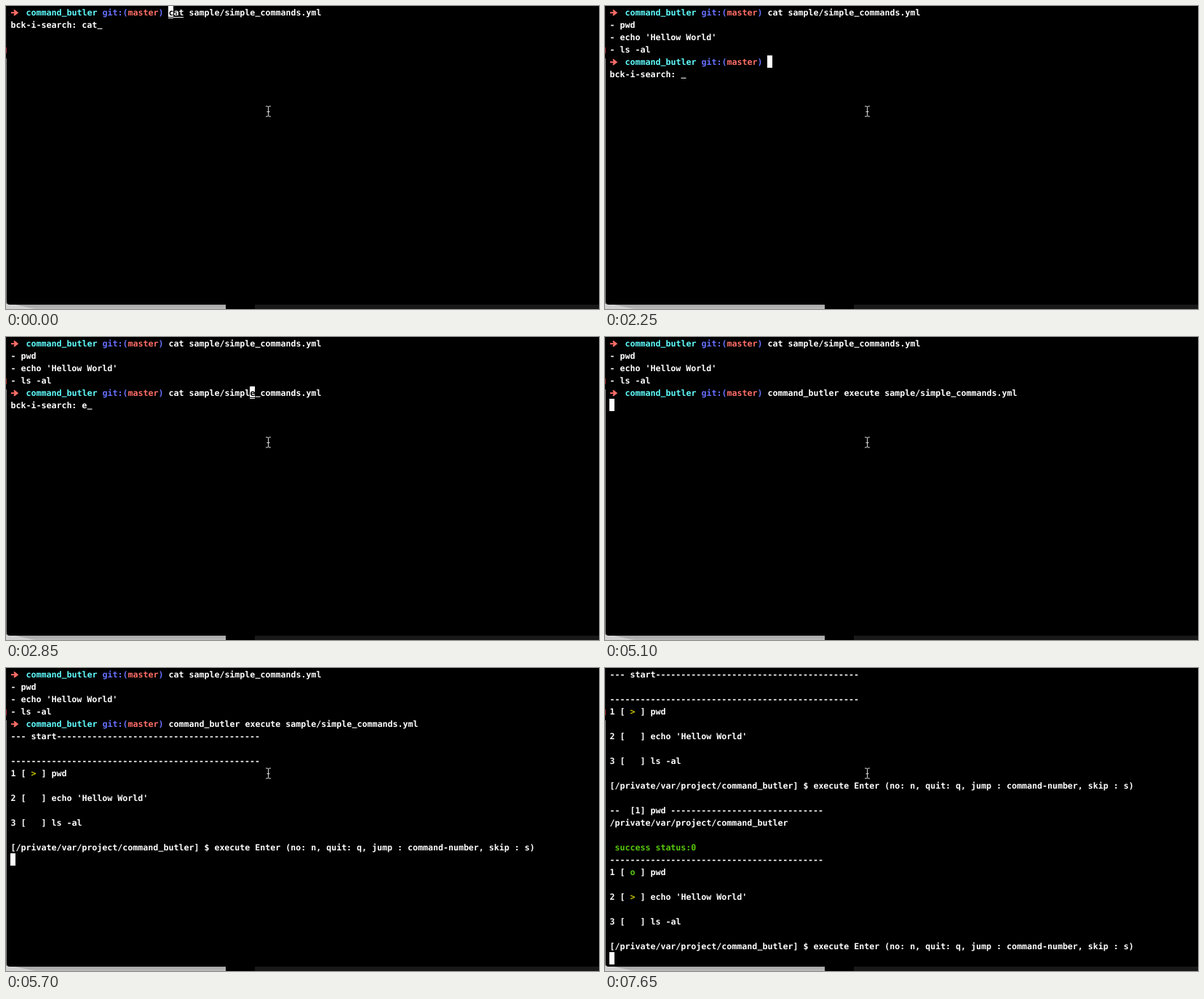
These frames come from a looping animation (815 px wide and 417 px high, 8000 ms). An HTML page:

```html
<!DOCTYPE html>
<html lang="en">
<head>
<meta charset="utf-8">
<title>Terminal session</title>
<style>
  html, body { margin: 0; width: 100%; height: 100%; overflow: hidden; background: #000; }
  svg { display: block; width: 815px; height: 417px; }
  text {
    font: 700 11.627px "DejaVu Sans Mono", monospace;
    font-variant-ligatures: none;
    text-rendering: geometricPrecision;
    white-space: pre;
  }
</style>
</head>
<body>
<svg viewBox="0 0 815 417">
  <defs>
    <linearGradient id="shade" x1="0" y1="0" x2="0" y2="1">
      <stop offset="0" stop-color="#8c8c8c"/>
      <stop offset="1" stop-color="#bcbcbc"/>
    </linearGradient>
  </defs>
  <!-- desktop behind the window -->
  <rect width="815" height="417" fill="#000"/>
  <rect width="1" height="72" fill="#101010"/>
  <rect y="57" width="1" height="8" fill="#a8322c"/>
  <rect y="72" width="1" height="338" fill="#8c8c8c"/>
  <rect y="405" width="302" height="12" fill="url(#shade)"/>
  <path d="M0 410H8L40 417H0Z" fill="#d2d2d2"/>
  <rect x="342" y="411" width="473" height="6" fill="#191919"/>
  <path d="M1 0H815V411H5Q1 411 1 407Z" fill="#000"/>
  <g id="screen"></g>
  <!-- mouse pointer -->
  <path d="M357 138h2q1.5 0 1.5 1.5v11q0 1.5-1.5 1.5h-2M364 138h-2q-1.5 0-1.5 1.5v11q0 1.5 1.5 1.5h2M358.5 145.5h4"
        fill="none" stroke="#d8d8d8"/>
</svg>
<script>
const LOOP = 8000, CELL = 7, ROW = 17, LEFT = 6, BASE = 13, BEARING = 0.5;
const WHITE = '#fff', RED = '#ff6e67', CYAN = '#60fdff', BLUE = '#6871ff';
const GREEN = '#58c80c', YELLOW = '#c7c400';
const screenEl = document.getElementById('screen');

// A line is a list of runs: [text, colour]
const plain = s => [[s, WHITE]];
const prompt = cmd => [
  ['➜', RED], ['  ', WHITE], ['command_butler', CYAN], [' git:(', BLUE],
  ['master', RED], [') ', BLUE], [cmd, WHITE]
];
const step = (n, mark, cmd) => [
  [n + ' [ ', WHITE], [mark, mark === 'o' ? GREEN : YELLOW], [' ] ' + cmd, WHITE]
];
const dashes = n => '-'.repeat(n);
const search = s => plain('bck-i-search: ' + s + '_');

const BLANK = [];
const CAT = 'cat sample/simple_commands.yml';
const RUN = 'command_butler execute sample/simple_commands.yml';
const DIR = '/private/var/project/command_butler';
const START = 31; // first column after the prompt

const steps = marks => ['pwd', "echo 'Hellow World'", 'ls -al']
  .flatMap((cmd, i) => [step(i + 1, marks[i], cmd), BLANK])
  .concat([plain(`[${DIR}] $ execute Enter (no: n, quit: q, jump : command-number, skip : s)`)]);

const listing = [prompt(CAT), plain('- pwd'), plain("- echo 'Hellow World'"), plain('- ls -al')];
const launched = [...listing, prompt(RUN)];
const asked = [...launched, plain('--- start' + dashes(40)), BLANK, plain(dashes(49)), ...steps('>  ')];
const done = [...asked, BLANK, plain('--  [1] pwd ' + dashes(30)), plain(DIR), BLANK,
  [[' success status:0', GREEN]], plain(dashes(42))];
const next = [...done, ...steps('o> ')].slice(5);

// cursor: [row, column, covered character, underlined length]
const states = [
  { at: 0, lines: [prompt(CAT), search('cat')], cursor: [0, START, 'c', 3] },
  { at: 150, lines: [...listing, prompt('')], cursor: [4, START] },
  { at: 2250, lines: [...listing, prompt(''), search('')], cursor: [4, START] },
  { at: 2850, lines: [...listing, prompt(CAT), search('e')], cursor: [4, START + 16, 'e', 1] },
  { at: 3150, lines: [...launched, search('ex')], cursor: [4, START + 15, 'e', 2] },
  { at: 3450, lines: [...launched, search('exe')], cursor: [4, START + 15, 'e', 3] },
  { at: 5100, lines: launched, cursor: [5, 0] },
  { at: 5700, lines: asked, cursor: [15, 0] },
  { at: 7050, lines: done, cursor: [21, 0] },
  { at: 7650, lines: next, cursor: [23, 0] }
];

function add(tag, attrs, text) {
  const el = document.createElementNS('http://www.w3.org/2000/svg', tag);
  for (const k in attrs) el.setAttribute(k, attrs[k]);
  if (text) el.textContent = text;
  screenEl.append(el);
}

const colX = col => LEFT + col * CELL;

function drawText(row, col, s, fill) {
  // underscores sit slightly higher than the font places them
  for (const part of s.match(/_+|[^_]+/g) || []) {
    const y = row * ROW + BASE - (part[0] === '_' ? 1.5 : 0);
    if (part.trim()) add('text', { x: colX(col) + BEARING, y, fill }, part);
    col += part.length;
  }
}

function drawLine(runs, row) {
  let col = 0;
  for (const [s, fill] of runs) {
    if (s === '➜') {
      add('path', { d: `M7 ${row * ROW + 8.2}h4.6l-1.2-2.6 1.4-.6 5.4 4.2-5.4 4.2-1.4-.6 1.2-2.6h-4.6z`, fill });
    } else {
      drawText(row, col, s, fill);
    }
    col += s.length;
  }
}

function drawCursor([row, col, char, len = 0]) {
  const x = colX(col), y = row * ROW;
  if (len) add('rect', { x, y: y + 15, width: len * CELL, height: 1, fill: WHITE });
  add('rect', { x, y, width: CELL, height: ROW, fill: WHITE });
  if (char) {
    drawText(row, col, char, '#000');
    add('rect', { x, y: y + 15, width: CELL, height: 1, fill: '#000' });
  }
}

let shown;
function show(state) {
  if (state === shown) return;
  shown = state;
  screenEl.replaceChildren();
  state.lines.forEach(drawLine);
  drawCursor(state.cursor);
}

const origin = performance.now();
function tick() {
  const t = (performance.now() - origin) % LOOP;
  show(states.findLast(s => s.at <= t));
  requestAnimationFrame(tick);
}
tick();
</script>
</body>
</html>
```
